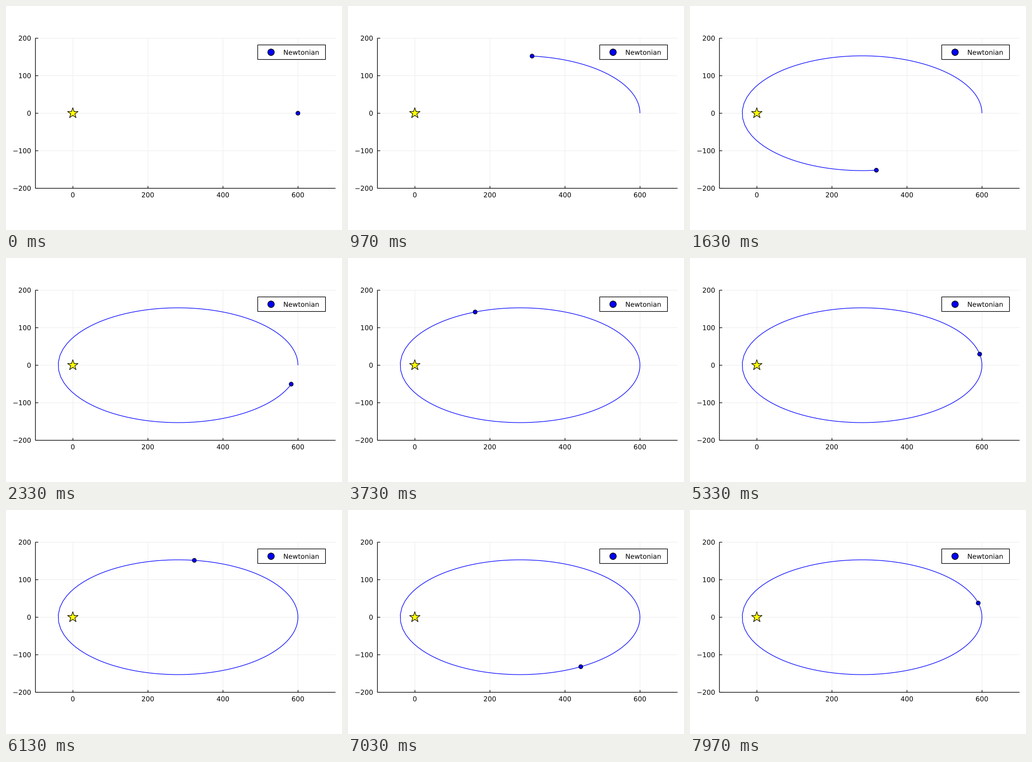
A matplotlib script that plays this animation: 600x400 px, repeating every 8000 ms.

```python
import numpy as np
import matplotlib.pyplot as plt
from matplotlib.animation import FuncAnimation
from matplotlib.patches import Circle, PathPatch, Polygon, Rectangle
from matplotlib.textpath import TextPath
from matplotlib.transforms import Affine2D

W, H, DPI = 600, 400, 100
LOOP, INTERVAL, FPS = 8000, 20, 30
PT = 72 / DPI                       # points per pixel
X0, Y0, SCALE = 119.3, 191.45, 0.67  # origin and pixels per data unit
FONT, CAP = 12, 0.729               # pixels, cap height in em

# Kepler orbit, anomalies measured from the far point
FAR, NEAR = 600, 39
A, C = (FAR + NEAR) / 2, (FAR - NEAR) / 2
B, ECC = np.sqrt(FAR * NEAR), C / A
RATE = 0.08082                      # mean anomaly per step
SUB = 5                             # trail points per step
LAP = int(np.ceil(2 * np.pi / RATE * SUB))

plt.rcParams["font.family"] = "DejaVu Sans"
fig = plt.figure(figsize=(W / DPI, H / DPI), dpi=DPI, facecolor="white")
ax = fig.add_axes([0, 0, 1, 1])
ax.set_xlim(0, W)
ax.set_ylim(H, 0)
ax.axis("off")


def px(x):
    return X0 + SCALE * x


def py(y):
    return Y0 - SCALE * y


def line(xs, ys, color="black", width=1.1, z=1):
    return ax.plot(xs, ys, color=color, lw=width * PT, zorder=z,
                   solid_capstyle="butt", solid_joinstyle="round")[0]


def dot(x, y, r, z, edge=1.0):
    return ax.add_patch(Circle((x, y), r, fc="blue", ec="black",
                               lw=edge * PT, zorder=z))


def label(x, y, text, align):
    """Place text with its ink at x (align 0 left, 0.5 middle, 1 right)."""
    path = TextPath((0, 0), text, size=FONT)
    ink = path.get_extents()
    place = Affine2D().scale(1, -1).translate(
        x - ink.x0 - align * ink.width, y + CAP * FONT / 2)
    ax.add_patch(PathPatch(place.transform_path(path), fc="black", lw=0,
                           snap=False, zorder=6))


def orbit(steps):
    table = np.linspace(0, 8 * np.pi, 20001)
    e = np.interp(RATE * steps, table + ECC * np.sin(table), table)
    return px(C + A * np.cos(e)), py(B * np.sin(e))


left, right, top, bottom = px(-100), px(700), py(200), py(-200)

for v in range(0, 601, 200):
    line([px(v)] * 2, [top, bottom], "#eeeeee", 1, 0)
    line([px(v)] * 2, [bottom, bottom - 4.5])
    label(px(v), 337.2, str(v), 0.5)
for v in range(-200, 201, 100):
    line([left, right], [py(v)] * 2, "#eeeeee", 1, 0)
    line([left, left + 4.5], [py(v)] * 2)
    label(44.1, py(v), str(v).replace("-", "\u2212"), 1)
line([left, left], [top, bottom])
line([left, right], [bottom, bottom])

angle = np.arange(10) * np.pi / 5
radius = np.where(np.arange(10) % 2, 0.382, 1) * 9.9
ax.add_patch(Polygon(np.c_[X0 + radius * np.sin(angle), Y0 - radius * np.cos(angle)],
                     fc="yellow", ec="black", lw=PT, joinstyle="round", zorder=3))

ax.add_patch(Rectangle((449.4, 69.4), 121, 26, fc="white", ec="black",
                       lw=1.1 * PT, zorder=5))
dot(473.3, 82.6, 5.75, 6, 1.2)
label(496.4, 82.7, "Newtonian", 0)

steps = np.arange(LOOP * FPS // 1000 * SUB) / SUB
trail_x, trail_y = orbit(steps)
trail = line([], [], "blue", 1.1, 2)
planet = dot(trail_x[0], trail_y[0], 3.6, 4)


def draw(i):
    step = round((i + 0.5) * INTERVAL * FPS / 1000)
    n = min(step, LOOP * FPS // 1000 - 1) * SUB
    shown = min(n, LAP) + 1         # later laps retrace the first
    trail.set_data(trail_x[:shown], trail_y[:shown])
    planet.center = trail_x[n], trail_y[n]
    return trail, planet


anim = FuncAnimation(fig, draw, frames=LOOP // INTERVAL, interval=INTERVAL,
                     repeat=True, repeat_delay=0, blit=False)
plt.show()
```
